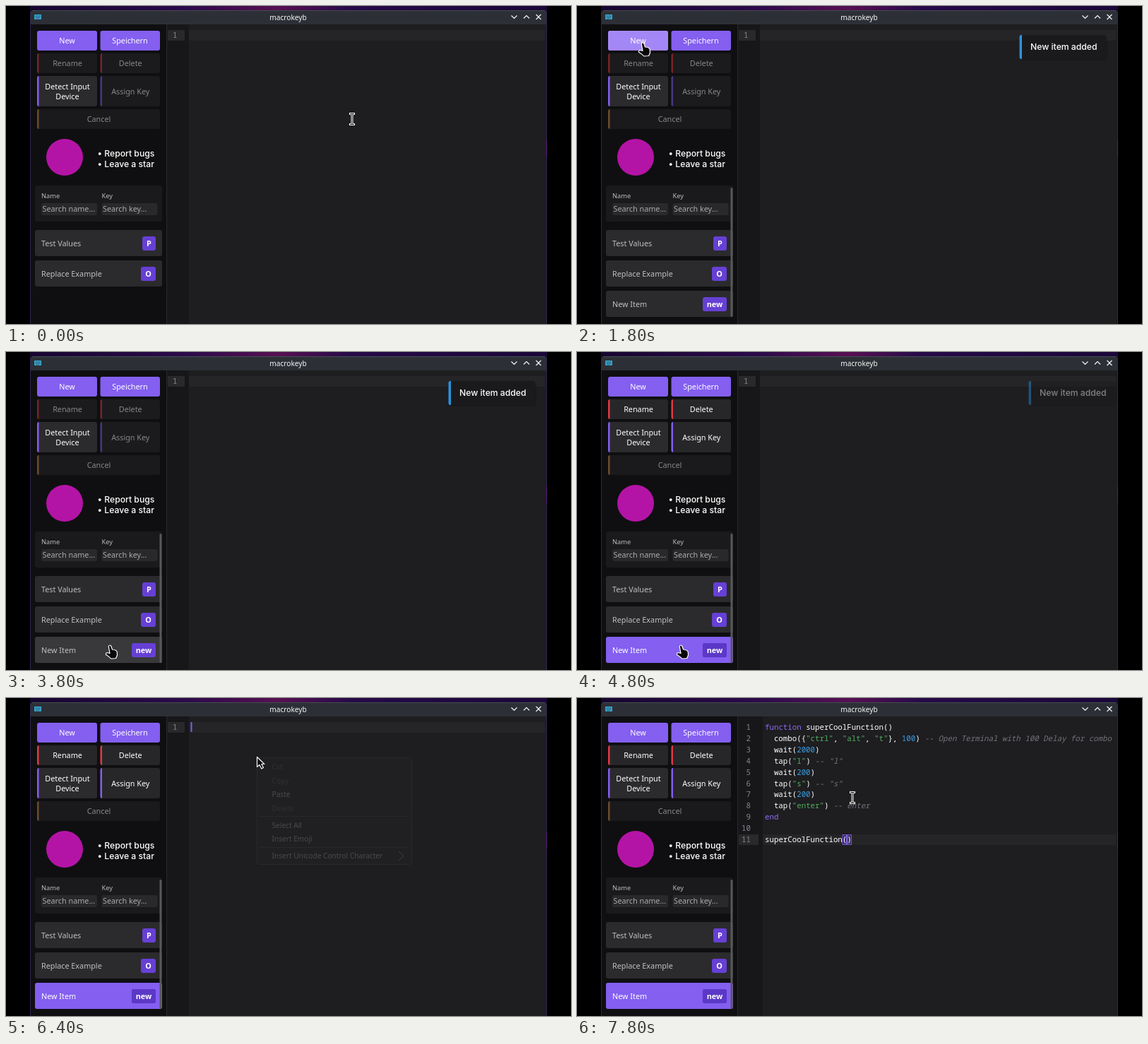
Recreate the animation shown at these times as an HTML page. Size 800 by 450 pixels, loop 8 s.

```html
<!DOCTYPE html>
<html lang="en">
<head>
<meta charset="utf-8">
<title>macrokeyb</title>
<style>
html, body { margin: 0; width: 100%; height: 100%; overflow: hidden; background: #000; }
svg { display: block; width: 800px; height: 450px; }
text { font: 10.8px "Noto Sans", sans-serif; fill: #fff; white-space: pre; }
.mid { text-anchor: middle; }
.end { text-anchor: end; }
.button text { font-weight: 500; text-anchor: middle; }
.button.off { opacity: .5; }
.small { font-size: 9.3px; fill: #bbb; }
.hint { fill: #aaa; }
.list text { fill: #c0c0c0; }
.list .badge { font-weight: 700; fill: #fff; text-anchor: middle; }
.inter { font: 500 12.2px Inter, sans-serif; }
.system, .menu text { font-size: 10.15px; fill: #f4f4f4; }
.menu .dim { fill: #74787c; }
.mono, .code text { font: 500 10.77px "Noto Sans Mono", monospace; }
.code text.number, .mono { fill: #85858c; font-weight: 400; }
.code .comment { fill: #74747a; font-style: italic; font-weight: 400; }
.code .string { fill: #50b060; }
.code .keyword { fill: #8c6df2; }
.code .digit { fill: #379fe4; }

/* Every change falls on a 200 ms step: 2.5% of the loop. */
[class*="play-"] { animation: 8s step-end infinite; }
.play-hover { animation-name: hover; }
.play-added { animation-name: added; }
.play-toast { animation-name: toast; }
.play-over { animation-name: over; }
.play-select { animation-name: select; }
.play-enable { animation-name: enable; }
.play-save { animation-name: save; }
.play-caret { animation-name: caret; }
.play-menu { animation-name: menu; }
.play-paste { animation-name: paste; }
.play-empty { animation-name: empty; }
.play-code { animation-name: code; }
.play-path { animation-name: path; }
.play-beam { animation-name: beam; }
.play-arrow { animation-name: arrow; }
.play-hand { animation-name: hand; }

@keyframes hover { 0% { opacity: 0 } 17.5% { opacity: 1 } 32.5%, 100% { opacity: 0 } }
@keyframes added { 0% { opacity: 0 } 20%, 100% { opacity: 1 } }
@keyframes toast {
  0% { opacity: 0; transform: none }
  20% { opacity: 1; transform: none }
  60% { opacity: .45; transform: translate(13px, 0) }
  62.5%, 100% { opacity: 0; transform: none }
}
@keyframes over { 0% { opacity: 0 } 45% { opacity: 1 } 50%, 100% { opacity: 0 } }
@keyframes select { 0% { opacity: 0 } 50%, 100% { opacity: 1 } }
@keyframes enable { 0% { opacity: .5 } 50%, 100% { opacity: 1 } }
@keyframes save { 0% { opacity: 1 } 82.5% { opacity: .5 } 95%, 100% { opacity: 1 } }
@keyframes caret { 0% { opacity: 0 } 72.5% { opacity: 1 } 82.5%, 100% { opacity: 0 } }
@keyframes menu {
  0% { opacity: 0 } 80% { opacity: .2 } 82.5% { opacity: 1 }
  92.5% { opacity: .4 } 95%, 100% { opacity: 0 }
}
@keyframes paste { 0% { opacity: 0 } 87.5%, 100% { opacity: 1 } }
@keyframes empty { 0% { opacity: 1 } 92.5%, 100% { opacity: 0 } }
@keyframes code { 0% { opacity: 0 } 92.5%, 100% { opacity: 1 } }
@keyframes path {
  0% { transform: translate(490px, 160px) }
  2.5% { transform: translate(440px, 250px) }
  5% { transform: translate(310px, 345px) }
  7.5% { transform: translate(170px, 365px) }
  10% { transform: translate(112px, 235px) }
  12.5% { transform: translate(82px, 90px) }
  15% { transform: translate(68px, 20px) }
  17.5% { transform: translate(86px, 44px) }
  20% { transform: translate(93px, 52px) }
  32.5% { transform: translate(97px, 92px) }
  35% { transform: translate(110px, 180px) }
  37.5% { transform: translate(122px, 260px) }
  40% { transform: translate(129px, 302px) }
  42.5% { transform: translate(137px, 357px) }
  45% { transform: translate(145px, 408px) }
  47.5% { transform: translate(147px, 415px) }
  62.5% { transform: translate(175px, 370px) }
  65% { transform: translate(240px, 250px) }
  67.5% { transform: translate(310px, 140px) }
  70% { transform: translate(345px, 95px) }
  72.5% { transform: translate(355px, 83px) }
  82.5% { transform: translate(367px, 106px) }
  85% { transform: translate(383px, 128px) }
  87.5%, 100% { transform: translate(390px, 141px) }
}
@keyframes beam {
  0% { opacity: 1 } 7.5% { opacity: 0 } 65% { opacity: 1 }
  80% { opacity: 0 } 95%, 100% { opacity: 1 }
}
@keyframes arrow {
  0% { opacity: 0 } 7.5% { opacity: 1 } 17.5% { opacity: 0 } 32.5% { opacity: 1 }
  45% { opacity: 0 } 62.5% { opacity: 1 } 65% { opacity: 0 } 80% { opacity: 1 }
  95%, 100% { opacity: 0 }
}
@keyframes hand {
  0% { opacity: 0 } 17.5% { opacity: 1 } 32.5% { opacity: 0 }
  45% { opacity: 1 } 62.5%, 100% { opacity: 0 }
}
</style>
</head>
<body>
<svg viewBox="0 0 800 450">
  <defs>
    <linearGradient id="sky">
      <stop offset="0" stop-color="#16062f"/>
      <stop offset=".3" stop-color="#2b0a4a"/>
      <stop offset=".48" stop-color="#571052"/>
      <stop offset=".62" stop-color="#260a48"/>
      <stop offset="1" stop-color="#1a0738"/>
    </linearGradient>
    <clipPath id="window"><path d="M35 450V9Q35 6 38 6H762Q765 6 765 9V450Z"/></clipPath>
  </defs>

  <rect x="34" width="732" height="10" fill="url(#sky)"/>
  <path d="M34.5 8V450M765.5 8V450" stroke="#33244f"/>
  <path d="M765.5 190V214" stroke="#5a1a80"/>
  <g clip-path="url(#window)">
    <rect x="35" y="6" width="730" height="20" fill="#2c3036"/>
    <rect x="35" y="26" width="193" height="424" fill="#0f0f11"/>
    <rect x="227" y="26" width="1" height="424" fill="#2a2a2d"/>
    <rect x="228" y="26" width="537" height="424" fill="#1e1d20"/>
  </g>
  <path d="M37 6.5H763" stroke="#464a50"/>
  <rect x="40" y="12" width="10" height="7" rx="1" fill="#3aa5cf"/>
  <path d="M41.5 14H49M41.5 16H49M43 17.8H47" stroke="#17384a" stroke-dasharray="1 .8"/>
  <text class="system mid" x="399.5" y="19.5">macrokeyb</text>
  <path d="M715.5 13.5L719.5 17.5 723.5 13.5M733 17.5L737 13.5 741 17.5M750.5 12L757.5 19M757.5 12L750.5 19"
    fill="none" stroke="#f4f4f4" stroke-width="1.2"/>

  <g class="play-empty">
    <rect x="228" y="26" width="31" height="424" fill="#17171a"/>
    <rect x="229" y="34" width="24" height="15" fill="#29292c"/>
    <rect x="259" y="34" width="504" height="15" fill="#252528"/>
    <text class="mono end" x="242.5" y="45">1</text>
    <rect class="play-caret" x="261.5" y="34" width="2" height="14" fill="#805ce8"/>
  </g>
  <g class="play-code">
    <rect x="228" y="26" width="35" height="424" fill="#17171a"/>
    <rect x="229" y="193" width="28" height="15" fill="#29292c"/>
    <rect x="263" y="193" width="500" height="15" fill="#252528"/>
    <path d="M376 193.5H382V207.5H376ZM382.5 193.5H388.5V207.5H382.5Z" fill="#3b2d69" stroke="#7555d0"/>
    <g class="code" id="code"></g>
    <rect x="381.5" y="194" width="1.5" height="13" fill="#9577f5"/>
  </g>

  <g class="button">
    <rect x="44" y="35" width="85" height="28" rx="3" fill="#845ff0"/>
    <rect class="play-hover" x="44" y="35" width="85" height="28" rx="3" fill="#a487f6"/>
    <text x="86.5" y="52.7">New</text>
  </g>
  <g class="button play-save">
    <rect x="133.5" y="35" width="84.5" height="28" rx="3" fill="#845ff0"/>
    <text x="175.5" y="52.7">Speichern</text>
  </g>
  <g id="buttons"></g>

  <circle cx="83" cy="214" r="26" fill="#b414a6"/>
  <text class="inter" x="129.5" y="212.7">• Report bugs</text>
  <text class="inter" x="129.5" y="227.7">• Leave a star</text>

  <rect x="41" y="254" width="180" height="51" rx="3" fill="#1a1a1c"/>
  <text class="small" x="50" y="272">Name</text>
  <text class="small" x="135.5" y="272">Key</text>
  <rect x="50" y="279" width="79" height="17" rx="3" fill="#29292b"/>
  <rect x="135.5" y="279" width="79" height="17" rx="3" fill="#29292b"/>
  <text class="hint" x="51.5" y="291.3">Search name...</text>
  <text class="hint" x="137" y="291.3">Search key...</text>

  <g class="list">
    <g>
      <rect x="41" y="317" width="180" height="37" rx="3" fill="#2b2b2d"/>
      <text x="50" y="339.7">Test Values</text>
      <rect x="193" y="326" width="19" height="20" rx="3" fill="#6640d5"/>
      <text class="badge" x="202.5" y="339.7">P</text>
    </g>
    <g>
      <rect x="41" y="360" width="180" height="37" rx="3" fill="#2b2b2d"/>
      <text x="50" y="382.7">Replace Example</text>
      <rect x="191" y="369" width="21" height="20" rx="3" fill="#6640d5"/>
      <text class="badge" x="201.5" y="382.7">O</text>
    </g>
    <g class="play-added">
      <rect x="41" y="403" width="180" height="37" rx="3" fill="#2b2b2d"/>
      <rect class="play-over" x="41" y="403" width="180" height="37" rx="3" fill="#39393c"/>
      <text x="50" y="425.7">New Item</text>
      <g class="play-select">
        <rect x="41" y="403" width="180" height="37" rx="3" fill="#845ff0"/>
        <text x="50" y="425.7" style="fill:#fff">New Item</text>
      </g>
      <rect x="178" y="412" width="34" height="20" rx="3" fill="#6640d5"/>
      <rect class="play-select" x="178" y="412" width="34" height="20" rx="3" fill="#5b38c6"/>
      <text class="badge" x="195" y="425.7">new</text>
      <rect x="217.5" y="257" width="3" height="183" rx="1.5" fill="#58585b"/>
    </g>
  </g>

  <g class="play-toast">
    <rect x="626" y="42" width="125" height="35" rx="5" fill="#000" opacity=".18"/>
    <rect x="627" y="41" width="122" height="34" rx="3" fill="#1a1a1c"/>
    <path d="M630 41V75H629Q626.500 75 626.500 72V44Q626.500 41 629 41Z" fill="#2b92dd"/>
    <text class="inter" x="642" y="62.300">New item added</text>
  </g>

  <g class="menu play-menu">
    <rect x="355.500" y="84.500" width="219" height="151" rx="3" fill="#2a2e33" stroke="#565a5f"/>
    <path d="M359 167.500H571M359 211.500H571" stroke="#565a5f"/>
    <rect class="play-paste" x="358.500" y="126.500" width="213" height="19" rx="2" fill="#22567a" stroke="#3da5dd"/>
    <text class="dim" x="376.500" y="101.200">Cut</text>
    <text class="dim" x="376.500" y="120.700">Copy</text>
    <text x="376.500" y="140.200">Paste</text>
    <text class="dim" x="376.500" y="159.700">Delete</text>
    <text x="376.500" y="183.700">Select All</text>
    <text x="376.500" y="203.200">Insert Emoji</text>
    <text x="376.500" y="227.400">Insert Unicode Control Character</text>
    <path d="M556 217L563 223.500 556 230" fill="none" stroke="#c4c6c8"/>
  </g>

  <g class="play-path" stroke-linejoin="round">
    <g class="play-beam" fill="none">
      <path d="M-4-7.500H4M0-7.500V7.500M-4 7.500H4" stroke="#fff" stroke-width="3"/>
      <path d="M-3-7.500H3M0-7.500V7.500M-3 7.500H3" stroke="#111"/>
    </g>
    <path class="play-arrow" d="M.5.5V14.500L3.800 11.500 6.800 17 9.500 15.500 6.800 10.500H10.800Z"
      fill="#080808" stroke="#fff" stroke-width="1.200"/>
    <path class="play-hand" fill="#080808" stroke="#fff" stroke-width="1.200"
      d="M-1.800 1.500Q0-1.200 1.800 1L3.500 6Q9.500 6.500 10.300 9.500L10.500 14Q10 16 8.800 17.500V18.500L1.800 19Q-1 15.500-5.500 13.500Q-6 10.500-3.500 10.500L0 11.500Z"/>
  </g>
</svg>
<script>
const buttons = [
  { x: 44, y: 67, w: 85, h: 28, edge: '#df3a42', mode: 'play-enable', lines: ['Rename'] },
  { x: 133.5, y: 67, w: 84.5, h: 28, edge: '#df3a42', mode: 'play-enable', lines: ['Delete'] },
  { x: 44, y: 99, w: 85, h: 43, edge: '#845ff0', mode: '', lines: ['Detect Input', 'Device'] },
  { x: 133.5, y: 99, w: 84.5, h: 43, edge: '#845ff0', mode: 'play-enable', lines: ['Assign Key'] },
  { x: 44, y: 146, w: 174, h: 28, edge: '#c98a48', mode: 'off', lines: ['Cancel'] }
];

const drawButton = ({ x, y, w, h, edge, mode, lines }) => {
  const top = y + h / 2 + 4 - (lines.length - 1) * 7;
  const labels = lines.map((line, i) => `<text x="${x + w / 2 + .5}" y="${top + i * 14}">${line}</text>`);
  return `<g class="button ${mode}">
    <rect x="${x}" y="${y}" width="${w}" height="${h}" rx="3" fill="${mode ? '#272729' : '#2b2b2e'}"/>
    <path d="M${x + 2.5} ${y}Q${x} ${y} ${x} ${y + 3}V${y + h - 3}Q${x} ${y + h} ${x + 2.5} ${y + h}Z" fill="${edge}"/>
    ${labels.join('')}</g>`;
};
document.getElementById('buttons').innerHTML = buttons.map(drawButton).join('');

const script = `function superCoolFunction()
  combo({"ctrl", "alt", "t"}, 100) -- Open Terminal with 100 Delay for combo
  wait(2000)
  tap("l") -- "l"
  wait(200)
  tap("s") -- "s"
  wait(200)
  tap("enter") -- enter
end

superCoolFunction()`;

const kinds = ['comment', 'string', 'keyword', 'digit'];
const highlight = line => line.replace(/(--.*)|("[^"]*")|\b(function|end)\b|\b(\d+)\b/g,
  (token, ...groups) => `<tspan class="${kinds[groups.findIndex(Boolean)]}">${token}</tspan>`);

document.getElementById('code').innerHTML = script.split('\n').map((line, i) => {
  const y = 45 + i * 15.9;
  const indent = line.length - line.trimStart().length;
  return `<text class="number end" x="246" y="${y}">${i + 1}</text>
    <text x="${266 + indent * 6.46}" y="${y}">${highlight(line.trimStart())}</text>`;
}).join('');
</script>
</body>
</html>
```
